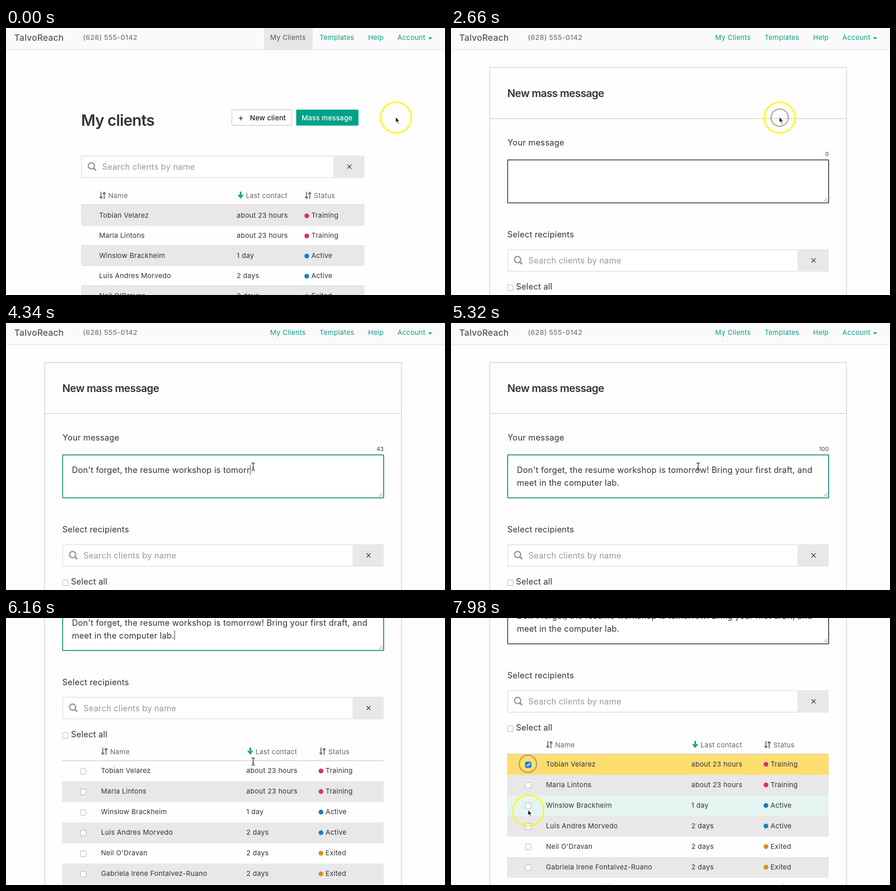
Recreate the animation shown at these times as an HTML page with a canvas. Size 959 by 584 pixels, loop 8 s.

```html
<!DOCTYPE html>
<html lang="en">
<head>
<meta charset="utf-8">
<title>Mass message</title>
<style>
html, body { margin: 0; width: 100%; height: 100%; overflow: hidden; background: #fefefe; }
canvas { display: block; }
</style>
</head>
<body>
<canvas id="stage" width="959" height="584"></canvas>
<script>
const ctx = document.getElementById('stage').getContext('2d');
const LOOP = 8000, STEP = 140;
const GREEN = '#0b9c86', INK = '#333', GREY = '#666', STRIPE = '#e8e8e8';
const PINK = '#d92b85', BLUE = '#1380c0', ORANGE = '#e08a1e';

const PAGE_AT = 2520, FOCUS_AT = 3640, TYPE_AT = 3920, TYPED_AT = 4900;
const SCROLL_AT = 5320, SCROLLED_AT = 6300, CHECK_AT = 7560;

const LINES = [
  "Don't forget, the resume workshop is tomorrow! Bring your first draft, and",
  'meet in the computer lab.'
];
const CLIENTS = [
  ['Tobian Velarez', 'about 23 hours', 'Training', PINK],
  ['Marla Lintons', 'about 23 hours', 'Training', PINK],
  ['Winslow Brackheim', '1 day', 'Active', BLUE],
  ['Luis Andres Morvedo', '2 days', 'Active', BLUE],
  ["Neil O'Dravan", '2 days', 'Exited', ORANGE],
  ['Gabriela Irene Fontalvez-Ruano', '2 days', 'Exited', ORANGE],
  ['Adelyn Prowse Thickel', '27 days', 'Active', BLUE]
];
// time, x, y
const PATH = [
  [560, 852, 196], [1400, 718, 196], [2660, 718, 196], [3360, 547, 303],
  [3640, 547, 303], [3920, 540, 314], [6440, 540, 314], [6860, 152, 326],
  [7140, 168, 319], [7560, 168, 319], [7980, 169, 421]
];
const CLICKS = [2240, FOCUS_AT, CHECK_AT];

const clamp = v => Math.max(0, Math.min(1, v));
const smooth = v => v * v * (3 - 2 * v);

function pointer(t) {
  let a = PATH[0];
  for (const b of PATH) {
    if (t < b[0]) {
      const k = b === a ? 0 : smooth((t - a[0]) / (b[0] - a[0]));
      return [a[1] + (b[1] - a[1]) * k, a[2] + (b[2] - a[2]) * k];
    }
    a = b;
  }
  return [a[1], a[2]];
}

// y is the middle of the capitals
function text(s, x, y, color = INK, size = 15, weight = 400, gap = size > 16 ? 0.25 : 0.3) {
  ctx.font = `${weight} ${size}px Inter, "Open Sans", sans-serif`;
  ctx.letterSpacing = gap + 'px';
  ctx.fillStyle = color;
  ctx.fillText(s, x, y + size * 0.36);
  return ctx.measureText(s).width;
}

function rect(x, y, w, h, color) {
  ctx.fillStyle = color;
  ctx.fillRect(x, y, w, h);
}

function box(x, y, w, h, r, fill, stroke, lw = 1) {
  ctx.beginPath();
  ctx.roundRect(x, y, w, h, r);
  if (fill) { ctx.fillStyle = fill; ctx.fill(); }
  if (stroke) { ctx.strokeStyle = stroke; ctx.lineWidth = lw; ctx.stroke(); }
}

function line(color, lw, ...p) {
  ctx.beginPath();
  for (let i = 0; i < p.length; i += 2) ctx.lineTo(p[i], p[i + 1]);
  ctx.strokeStyle = color;
  ctx.lineWidth = lw;
  ctx.stroke();
}

function poly(color, ...p) {
  ctx.beginPath();
  for (let i = 0; i < p.length; i += 2) ctx.lineTo(p[i], p[i + 1]);
  ctx.closePath();
  ctx.fillStyle = color;
  ctx.fill();
}

function circle(x, y, r, color, lw) {
  ctx.beginPath();
  ctx.arc(x, y, r, 0, Math.PI * 2);
  if (lw) { ctx.strokeStyle = color; ctx.lineWidth = lw; ctx.stroke(); }
  else { ctx.fillStyle = color; ctx.fill(); }
}

function sortIcon(x, y) {
  line(GREY, 2, x + 4, y - 8, x + 4, y + 6);
  line(GREY, 2, x + 0.8, y + 3, x + 4, y + 6.5, x + 7.2, y + 3);
  line(GREY, 2, x + 11, y + 8, x + 11, y - 6);
  line(GREY, 2, x + 7.8, y - 3, x + 11, y - 6.5, x + 14.2, y - 3);
}

function downIcon(x, y) {
  rect(x - 1.7, y - 8, 3.4, 9, GREEN);
  poly(GREEN, x - 6.2, y - 0.5, x - 4, y - 2, x, y + 2, x + 4, y - 2, x + 6.2, y - 0.5, x, y + 7.5);
}

function checkbox(x, y, on) {
  box(x - 6, y - 6, 12.5, 12.5, 2.5, on ? '#1b7be8' : '#fff', on ? '#1b6fd0' : '#a8a8a8');
  if (on) line('#fff', 2, x - 3, y + 0.5, x - 0.8, y + 3, x + 3.8, y - 3);
}

function search(x, y, w) {
  box(x + 1, y + 1, w - 2, 47, 0, '#fff', '#e6e6e6', 2);
  rect(x + w - 68, y, 68, 49, STRIPE);
  circle(x + 22.5, y + 22.5, 6.8, '#999', 2.8);
  line('#999', 3.6, x + 27, y + 27, x + 32.5, y + 32.5);
  text('Search clients by name', x + 46, y + 25, '#999', 18, 400, 0.22);
  const cx = x + w - 33, cy = y + 24.3;
  line(INK, 1.4, cx - 4.5, cy - 4.5, cx + 4.5, cy + 4.5);
  line(INK, 1.4, cx + 4.5, cy - 4.5, cx - 4.5, cy + 4.5);
}

function tableHead(y, name, contact, status) {
  sortIcon(name, y - 1);
  text('Name', name + 20, y, GREY);
  downIcon(contact + 8.5, y - 1);
  text('Last contact', contact + 20, y, GREY);
  sortIcon(status, y - 1);
  text('Status', status + 20, y, GREY);
}

function clientRow(client, y, name, contact, dot) {
  text(client[0], name, y);
  text(client[1], contact, y);
  circle(dot, y + 0.8, 5.2, client[3]);
  text(client[2], dot + 10, y);
}

function navBar(onClients) {
  rect(0, 0, 959, 47, '#fafafa');
  rect(0, 47, 959, 1, '#dcdcdc');
  if (onClients) rect(564, 0, 106, 47, '#e7e7e7');
  text('TalvoReach', 18, 21, '#555', 19, 500, 0.3);
  text('(628) 555-0142', 168, 21, '#777', 15, 500, 0.5);
  text('My Clients', 577, 21, onClients ? '#555' : GREEN);
  text('Templates', 685, 21, GREEN);
  text('Help', 791, 21, GREEN);
  text('Account', 855, 21, GREEN);
  poly(GREEN, 922, 20.5, 931, 20.5, 926.5, 25);
}

function clientsPage(hover) {
  navBar(true);
  text('My clients', 164, 201.5, INK, 34, 600, -0.9);
  box(493.5, 179, 131, 34, 2, '#fff', '#c9c9c9', 1.3);
  line('#222', 1.5, 508.5, 197.5, 517.5, 197.5);
  line('#222', 1.5, 513, 193, 513, 202);
  text('New client', 533, 196.5, '#1c1c1c', 15, 500);
  box(634, 178.5, 136, 35, 2, hover ? '#00b39f' : '#00a18a');
  text('Mass message', 646, 196.5, '#fff', 15, 500);

  search(164, 279, 619);
  tableHead(367, 203.5, 504, 652.5);
  rect(164, 386, 619, 1.5, '#d3d0c2');
  for (let i = 0; i < 5; i++) {
    const y = 388 + 44 * i;
    if (i % 2 === 0) rect(164, y, 619, 44, STRIPE);
    rect(164, y + 43, 619, 1, '#d8d8d8');
    clientRow(CLIENTS[i], y + 22, 203.5, 504, 657);
  }
  if (hover) {
    box(-4, 572, 245.5, 20, 3, '#ececec', '#a0a0a0');
    text('s/new', 0, 580, '#111', 11, 400, 0);
  }
}

function messageBox(t) {
  const focus = t >= FOCUS_AT && t < CHECK_AT;
  const count = Math.round(100 * clamp((t - TYPE_AT) / (TYPED_AT - TYPE_AT)));
  box(123.7, 288.5, 701.3, 94, 1, '#fff', focus ? '#128f7b' : '#4a4a4a', 2);
  line('#666', 1, 814, 380, 822, 372);
  line('#666', 1, 818.5, 380, 822, 376.5);
  ctx.textAlign = 'right';
  text(String(count), 825.3, 276, INK, 12);
  ctx.textAlign = 'left';

  const first = LINES[0].slice(0, count);
  const second = LINES[1].slice(0, Math.max(0, count - LINES[0].length - 1));
  let end = text(first, 144, 322, INK, 18, 400, 0.27), y = 310.5;
  if (count > LINES[0].length) {
    end = text(second, 144, 349.5, INK, 18, 400, 0.27);
    y += 27.5;
  }
  const lit = t < 5320 || Math.floor((t - 5320) / 500) % 2 === 1;
  if (focus && lit) rect(Math.round(144 + end), y, 1, 21.5, '#222');
}

function formPage(t, scroll, hoverRow) {
  ctx.save();
  ctx.translate(0, -scroll);
  navBar(false);
  box(84.5, 86.5, 779.5, 1400, 0, '#fefefe', '#dedbd2', 2);
  rect(85, 197, 779, 2, '#dedbd2');
  text('New mass message', 123, 142.8, INK, 23, 600, -0.65);
  text('Your message', 123.5, 250.5, INK, 18);
  messageBox(t);
  text('Select recipients', 123, 451.5, INK, 18);
  search(123, 484, 702);
  checkbox(129.3, 568);
  text('Select all', 142, 566, INK, 18);

  tableHead(604, 207.5, 525, 684);
  CLIENTS.forEach((client, i) => {
    const y = 624 + 45 * i, picked = i === 0 && t >= CHECK_AT;
    const fill = picked ? '#ffde70' : i === hoverRow ? '#e6f4f1' : i % 2 ? STRIPE : '#fefefe';
    rect(122.5, y, 702.5, 45, fill);
    rect(122.5, y + 45, 702.5, 1, '#d8d8d8');
    checkbox(168.5, y + 22.7, picked);
    clientRow(client, y + 21.2, 207.5, 525, 688);
  });
  rect(122.5, 622.7, 702.5, 1.6, '#d3d0c2');
  ctx.restore();
}

function outlined(d, x, y, fill, stroke) {
  ctx.save();
  ctx.translate(x, y);
  const p = new Path2D(d);
  ctx.lineJoin = 'round';
  ctx.lineWidth = 1.3;
  ctx.fillStyle = fill;
  ctx.fill(p);
  ctx.strokeStyle = stroke;
  ctx.stroke(p);
  ctx.restore();
}

const CURSORS = {
  arrow(x, y) {
    outlined('M0 0V13.5L3.2 10.6L5.4 15.8L7.6 14.8L5.4 9.8H9.4Z', x - 1, y - 2, '#111', '#fff');
  },
  hand(x, y) {
    outlined('M2.5 1.2Q4 0 4.8 1.8L6 5.6Q7.3 4.6 8.2 5.8Q9.6 5 10.4 6.3Q12.4 5.8 12.6 8'
      + 'Q13 11 11.6 13V15H5.2Q4.6 13 1 9.6Q-.4 7.6 1.4 7.4L3.6 8.8L2 3Q1.7 1.8 2.5 1.2Z',
      x - 4, y, '#fff', '#111');
    for (let i = 0; i < 3; i++) line('#111', 0.8, x + 2.4 + i * 2, y + 9.5, x + 2.6 + i * 2, y + 12.5);
  },
  beam(x, y) {
    line('#222', 1.4, x, y - 7, x, y + 7);
    for (const d of [-1, 1]) line('#222', 1.3, x - 3.8, y + 8 * d, x - 1.5, y + 7.6 * d, x, y + 6.6 * d, x + 1.5, y + 7.6 * d, x + 3.8, y + 8 * d);
    line('#222', 1.2, x - 2, y + 3, x + 2, y + 3);
  }
};

function clickRings(t) {
  for (const at of CLICKS) {
    const k = (t - at) / 560;
    if (k < 0 || k >= 1) continue;
    const [x, y] = pointer(at);
    circle(x, y, 8 + 14.5 * k, `rgba(125,115,95,${0.75 - 0.3 * k})`, 3);
  }
}

function draw(now) {
  const t = Math.floor((now % LOOP) / STEP) * STEP;
  const [x, y] = pointer(t);
  const k = clamp((t - SCROLL_AT) / (SCROLLED_AT - SCROLL_AT));
  const scroll = 326 * smooth(k ** 0.885);
  let kind = 'arrow';

  rect(0, 0, 959, 584, '#fefefe');
  if (t < PAGE_AT) {
    const hover = x > 634 && x < 770;
    clientsPage(hover);
    if (hover) kind = 'hand';
  } else {
    const row = t >= SCROLLED_AT ? Math.floor((y + scroll - 624) / 45) : -1;
    formPage(t, scroll, row);
    if (row >= 0) kind = t > 7000 && x > 160 ? 'arrow' : 'hand';
    else if (t >= SCROLL_AT || y > 288) kind = 'beam';
  }
  clickRings(t);
  if (t < TYPE_AT || t >= 6580) circle(x, y, 33.6, '#fbf90c', 3);
  CURSORS[kind](x, y);
}

const start = performance.now();
function tick() {
  draw(performance.now() - start);
  requestAnimationFrame(tick);
}
tick();
</script>
</body>
</html>
```
